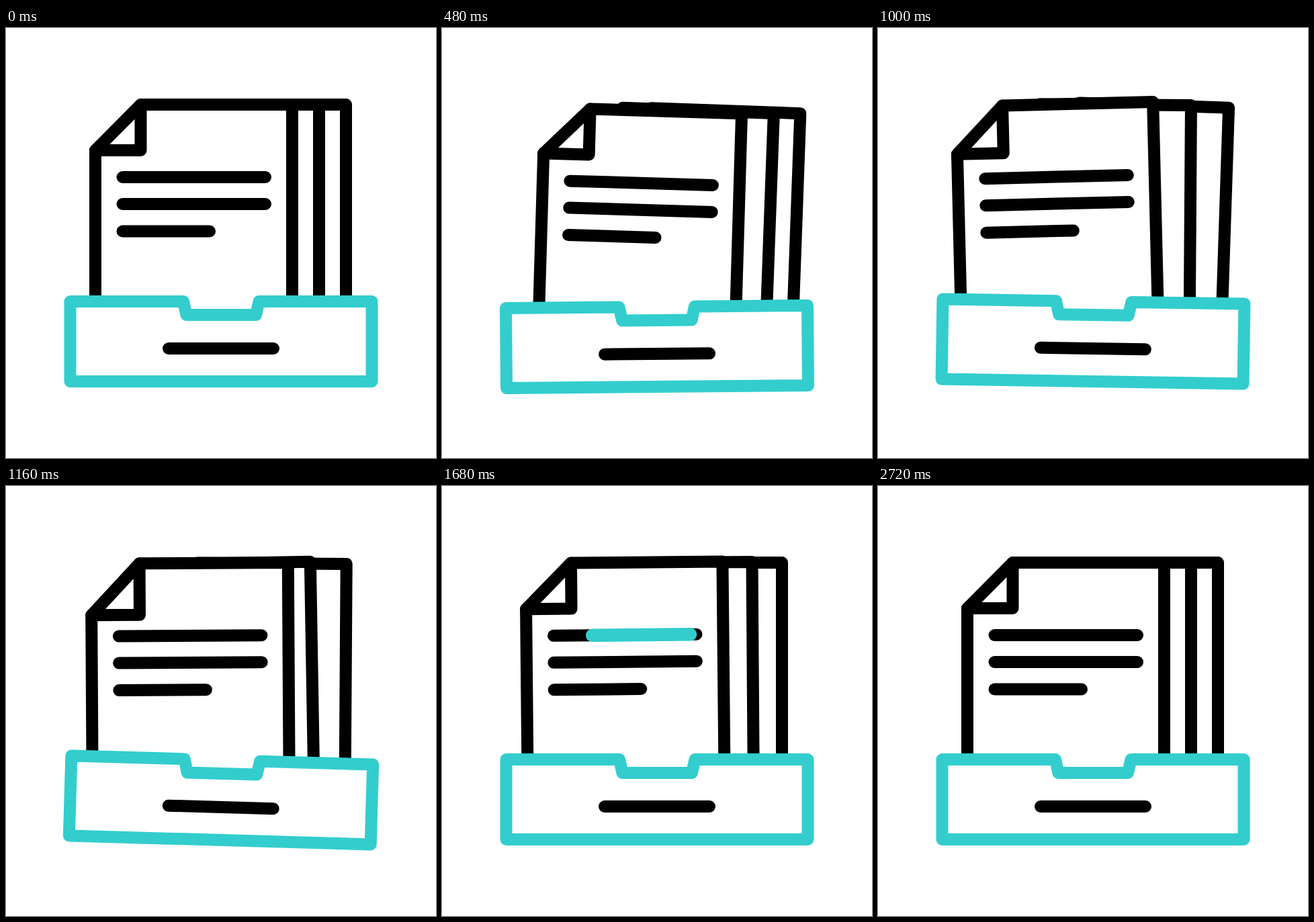
Write an HTML page that moves like this. It is 640 by 640 pixels and loops after 2.8 s.

```html
<!DOCTYPE html>
<html lang="en">
<head>
<meta charset="utf-8">
<title>Document tray</title>
<style>
html, body { margin: 0; width: 100%; height: 100%; overflow: hidden; background: #fff; }
svg { display: block; width: 100%; height: 100%; }
path { fill: none; stroke: #000; stroke-width: 18; stroke-linecap: round; stroke-linejoin: round; }
.fill { fill: #fff; stroke: none; }
.teal { stroke: #33cdcd; }
.mark { stroke-width: 19.5; }
</style>
</head>
<body>
<svg viewBox="0 0 640 640">
  <g id="back">
    <path class="fill" d="M275 114H506V495H275Z"/>
    <path d="M284 114H506V495"/>
  </g>
  <g id="middle">
    <path class="fill" d="M235 114H466V495H235Z"/>
    <path d="M241 114H466V495"/>
  </g>
  <g id="front">
    <path id="sheet" class="fill"/>
    <path id="outline"/>
    <path id="fold"/>
    <path d="M173.5 222H386M173.5 262H386M173.5 302.5H303"/>
    <path class="teal mark"/>
    <path class="teal mark"/>
    <path class="teal mark"/>
  </g>
  <g id="drawer">
    <path class="teal" style="fill:#fff" d="M95.5 407H264L268.5 427H372L376.5 407H544.5V526H95.5Z"/>
    <path d="M242 477H398"/>
  </g>
</svg>
<script>
const LOOP = 2800, STEP = 40, LAST = 2720;
const get = id => document.getElementById(id);
const clamp = u => Math.max(0, Math.min(1, u));
const smooth = u => { u = clamp(u); return u * u * (3 - 2 * u); };

// Each key is [time, value, ...].
const drop = [[0, 0], [360, 11], [480, 8], [560, 3.5], [740, -16], [1000, 0], [1140, 1], [1360, 0.7], [1560, 0]];
const tilt = [[0, 0], [340, 1.5], [480, -0.5], [620, -3.5], [1000, 0.9], [1120, 1.8], [1360, 0]];
const curl = [[880, 0], [1000, 0.3], [1240, 1.1], [1360, 1], [1640, 0]];

// Sheet keys: [time, sideways shift, degrees].
const sheets = [
  { node: get('back'), pivot: 370, keys: [[0, 0, 0], [480, 12, 2.07], [720, 14, 3], [1000, 2, 1.9], [1360, -4.3, -1.03], [1640, 0, 0]] },
  { node: get('middle'), pivot: 335, keys: [[0, 0, 0], [480, 12.3, 2.1], [620, 14, 2.6], [1000, -3, 0.4], [1180, -6, -1], [1360, -2.7, -0.1], [1500, 0, 0.5], [1680, -1.5, -0.4], [1960, 0, 0]] },
  { node: get('front'), pivot: 258, keys: [[0, 0, 0], [480, 7.5, 1.7], [600, 9, 2.1], [1000, -6.4, -1.4], [1360, 0, 1.15], [1680, -4.4, -0.56], [1960, 0, 0]] }
];

const lines = [[222, 386], [262, 386], [302.5, 303]];
const marks = document.querySelectorAll('.mark');

// Smooth curve through the keys, flat at every turning point.
function track(keys, t, c = 1) {
  const end = keys.length - 1;
  if (t <= keys[0][0]) return keys[0][c];
  if (t >= keys[end][0]) return keys[end][c];
  const i = keys.findIndex(k => k[0] > t) - 1;
  const slope = j => {
    if (j === 0 || j === end) return 0;
    const [a, b, d] = [keys[j - 1], keys[j], keys[j + 1]];
    return (b[c] - a[c]) * (d[c] - b[c]) <= 0 ? 0 : (d[c] - a[c]) / (d[0] - a[0]);
  };
  const p = keys[i], q = keys[i + 1], h = q[0] - p[0], u = (t - p[0]) / h;
  const s = smooth(u);
  return p[c] * (1 - s) + q[c] * s +
    h * u * (1 - u) * (slope(i) * (1 - u) - slope(i + 1) * u);
}

function drawFold(k) {
  const x = 200.5 + 4.5 * k, y = 182 + 9 * k;
  get('sheet').setAttribute('d', `M133 ${y}L${x} 114H426V495H133Z`);
  get('outline').setAttribute('d', `M133 495V${y}L${x} 114H426V495`);
  get('fold').setAttribute('d', `M133 ${y}H${x}V114`);
}

// A highlight grows along each line, then its tail catches up.
function drawMark(node, i, t) {
  const [y, right] = lines[i], left = 173.5, start = 1360 + 381 * i;
  const head = smooth((t - start) / 365), tail = smooth((t - start - 195) / 365);
  const at = u => left + (right - left) * u;
  const on = head > 0 && tail < 1;
  node.setAttribute('d', on ? `M${at(tail)} ${y}H${at(head)}` : '');
}

function draw(t) {
  const y = track(drop, t);
  for (const s of sheets) {
    const x = track(s.keys, t), a = track(s.keys, t, 2);
    s.node.setAttribute('transform', `translate(${x} ${y}) rotate(${a} ${s.pivot} 540)`);
  }
  get('drawer').setAttribute('transform', `translate(0 ${y}) rotate(${track(tilt, t)} 320 467)`);
  drawFold(track(curl, t));
  marks.forEach((m, i) => drawMark(m, i, t));
}

const began = performance.now();
function tick() {
  const t = (performance.now() - began) % LOOP;
  draw(Math.min(LAST, Math.floor(t / STEP) * STEP));
  requestAnimationFrame(tick);
}
tick();
</script>
</body>
</html>
```
